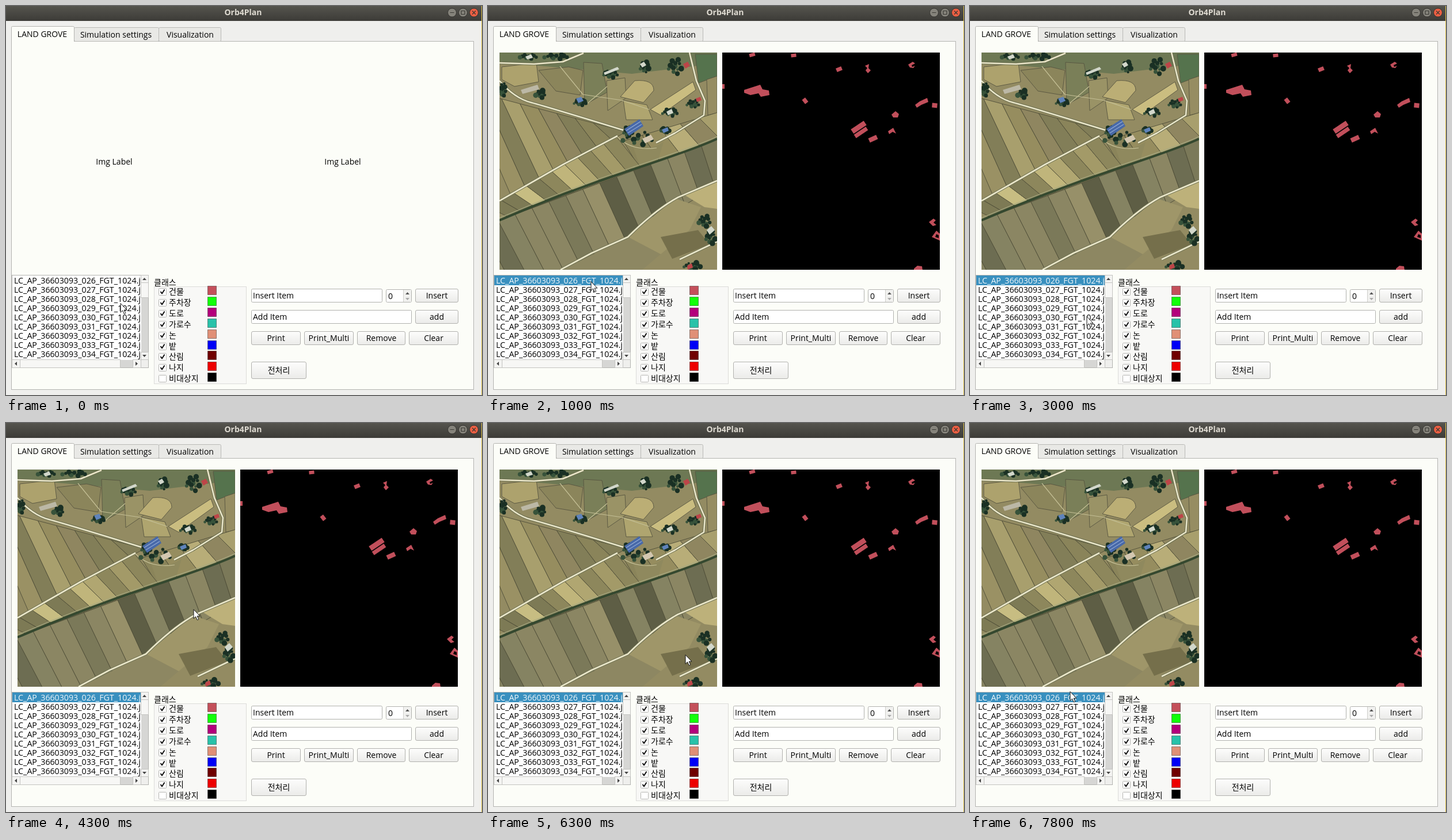
These frames come from a looping animation (827 px wide and 677 px high, 8000 ms). An HTML page:

```html
<!DOCTYPE html>
<html lang="ko">
<head>
<meta charset="utf-8">
<title>Orb4Plan</title>
<style>
html, body { margin: 0; width: 100%; height: 100%; overflow: hidden; background: #efefed; }
svg { display: block; }
text { font: 14px 'Open Sans', 'Noto Sans CJK KR', 'Noto Sans CJK', sans-serif; fill: #000; white-space: pre; }
.mid { text-anchor: middle; }
.title { font-weight: bold; fill: #dfdbd2; }
.row { font-size: 14.2px; }
.line { fill: none; stroke-linejoin: round; }
</style>
</head>
<body>
<svg id="stage" width="827" height="677" viewBox="0 0 827 677">
  <defs>
    <linearGradient id="bar" x2="0" y2="1"><stop stop-color="#55544e"/><stop offset="1" stop-color="#3c3b37"/></linearGradient>
    <linearGradient id="button" x2="0" y2="1"><stop stop-color="#fdfdfc"/><stop offset="1" stop-color="#ebebe9"/></linearGradient>
    <clipPath id="photoClip"><path d="M20 81h378v378H20z"/></clipPath>
    <clipPath id="maskClip"><path d="M407 81h378v378H407z"/></clipPath>
    <clipPath id="listClip"><path d="M11 469h223v146H11z"/></clipPath>
  </defs>
  <g id="chrome"></g>
  <g id="labels"></g>
  <g id="images">
    <g id="photo" clip-path="url(#photoClip)"></g>
    <g id="mask" clip-path="url(#maskClip)"></g>
  </g>
  <g id="list"></g>
  <g id="form"></g>
  <path id="cursor" d="M1 1.5V17.3L4.6 13.9 7.2 19.8 9.8 18.7 7.2 13H12Z" fill="#fff" stroke="#111"/>
</svg>
<script>
const $ = id => document.getElementById(id);
let layer;

function add(tag, attrs, text) {
  const node = document.createElementNS('http://www.w3.org/2000/svg', tag);
  for (const key in attrs) node.setAttribute(key, attrs[key]);
  if (text !== undefined) node.textContent = text;
  layer.append(node);
  return node;
}
const rect = (x, y, width, height, fill, more) => add('rect', { x, y, width, height, fill, ...more });
const box = (x, y, w, h, fill, stroke = '#b4b4b1', rx = 0) =>
  rect(x + .5, y + .5, w - 1, h - 1, fill, { stroke, rx });
const label = (x, y, text, cls = '') => add('text', { x, y, class: cls }, text);
const shape = (d, fill, more) => add('path', { d, fill, ...more });
const line = (d, stroke, width) => add('path', { d, stroke, 'stroke-width': width, class: 'line' });
const noise = n => { const v = Math.sin(n * 127.1 + 11.7) * 43758.5453; return v - Math.floor(v); };

function button(x, y, w, h, text) {
  box(x, y, w, h, 'url(#button)', '#b1b1ae', 2.5);
  label(x + w / 2, y + h / 2 + 5, text, 'mid');
}

function drawChrome() {
  layer = $('chrome');
  rect(0, 0, 827, 677, '#efefed');
  rect(0, 0, 827, 26, 'url(#bar)');
  rect(826, 0, 1, 677, '#d9bd45');
  label(412, 16, 'Orb4Plan', 'mid title');
  [775, 794, 813].forEach((cx, i) =>
    add('circle', { cx, cy: 11.5, r: 7.5, fill: i < 2 ? '#85837b' : '#ec5f43', stroke: '#343330' }));
  line('M771.5 11.5h7M791 8.5h6v6h-6zM810 8.5l6 6m0-6l-6 6', '#3a3934', 1.2);

  box(9, 61, 804, 607, '#fcfdf8');
  box(118, 37, 148, 25, '#e9e9e6', '#b9b9b6', 2);
  box(265, 37, 109, 25, '#e9e9e6', '#b9b9b6', 2);
  shape('M9.5 62V37.500q0-2 2-2H116.500q2 0 2 2V61', '#fcfdf8', { stroke: '#b4b4b1' });
  rect(10, 60, 108, 3, '#fcfdf8');
  label(63, 54, 'LAND GROVE', 'mid');
  label(191, 55, 'Simulation settings', 'mid');
  label(320, 55, 'Visualization', 'mid');

  layer = $('labels');
  label(188, 276, 'Img Label', 'mid');
  label(585, 276, 'Img Label', 'mid');
}

const soils = ['#9a9164', '#a89f6d', '#8a845a', '#968d5f', '#b8ad78', '#8f8660', '#827e58'];
const brightSoils = ['#a39a68', '#c0b57b', '#8d875c', '#b0a671', '#7d7a55', '#c7bd82'];
const darkSoils = ['#858362', '#6d6d52', '#979069', '#5e5e45', '#7b7959', '#8b8663'];

// Splits the area between two straight edges into field strips.
function strips([ax, ay, bx, by], [cx, cy, dx, dy], count, colors, seed) {
  const at = (a, b, t) => a + (b - a) * t;
  const edge = s => [`${at(ax, bx, s)} ${at(ay, by, s)}`, `${at(cx, dx, s)} ${at(cy, dy, s)}`];
  for (let i = 0; i < count; i++) {
    const [p, q] = edge(i / count), [r, s] = edge((i + 1) / count);
    shape(`M${p}L${r} ${s} ${q}Z`, colors[Math.floor(noise(seed + i) * colors.length)],
      { stroke: '#4f4d38', 'stroke-width': .9 });
  }
}

function grove(x, y, w, h, seed) {
  for (let i = 0; i < 12; i++) {
    const angle = i * 2.4, far = Math.sqrt(i / 12);
    add('circle', {
      cx: x + Math.cos(angle) * far * w, cy: y + Math.sin(angle) * far * h,
      r: 2 + noise(seed + i) * 3, fill: i % 3 ? '#1a3024' : '#37523a'
    });
  }
}

function drawPhoto() {
  layer = $('photo');
  rect(20, 81, 378, 378, '#938b62');
  shape('M20 81H398V100L250 118 20 98Z', '#6d7854');
  const patches = [
    ['M24 106L84 99 88 132 46 140 24 128Z', '#ada26d'],
    ['M88 112L140 106 165 112 160 155 118 148Z', '#8b855b'],
    ['M166 98L198 100 207 150 168 172Z', '#7a7f58'],
    ['M206 130L238 125 240 160 208 182Z', '#9a9366'],
    ['M255 130Q288 127 288 147L270 168 230 158Z', '#bbae75'],
    ['M282 180L356 132 361 146 300 190Z', '#cabd80'],
    ['M360 84H398V122L366 134Z', '#55734d'],
    ['M235 164L276 172 286 198 240 198Z', '#afa56f'],
    ['M380 128L398 122V186L382 190Z', '#968d62']
  ];
  for (const [d, fill] of patches) shape(d, fill, { stroke: '#565440', 'stroke-width': .9 });
  strips([-40, 145, 215, 212], [40, 330, 240, 219], 8, soils, 3);
  strips([235, 235, 400, 185], [265, 285, 440, 220], 5, soils, 31);
  strips([0, 350, 222, 226], [35, 367, 265, 280], 10, brightSoils, 12);
  strips([-100, 417, 400, 232], [-20, 560, 420, 300], 17, darkSoils, 43);
  shape('M243 402L325 335 370 350 350 390 300 432Z', '#9f9669');
  shape('M243 402L300 432 268 459H130Z', '#8d8762');
  shape('M300 402L365 390 385 415 320 440Z', '#756f4b');
  shape('M340 328L398 306V353L376 350Z', '#bdb17a');
  shape('M252 245Q275 255 305 237L295 270 265 282Z', '#8f895e');

  line('M20 373Q130 325 250 285T398 231', '#34482f', 4);
  line('M20 369Q130 321 250 281T398 227', '#a4a780', 1.3);
  const roads = 'M20 339L130 276 225 226M20 130Q45 160 75 168T235 216' +
    'M126 459L180 430 243 402Q290 355 330 333L398 304M20 99L80 101 130 97 166 82' +
    'M350 81L362 130 377 165 375 190 325 221 292 238M398 410L333 441';
  line(roads, '#6b6e4f', 4.5);
  line(roads, '#ebe7ca', 2.6);
  line('M225 228Q250 253 293 247M125 105L165 154 232 164 280 180M207 140L170 172', '#c4bf95', 1.2);

  const groves = ['325 105 14 14', '260 230 32 12', '243 218 9 9', '91 153 10 7', '160 168 13 5',
    '70 88 18 4', '118 88 25 4', '213 118 15 7', '272 106 9 10', '316 185 16 7', '356 170 13 7',
    '308 216 9 4', '376 374 12 10', '387 402 10 12', '355 452 18 6', '26 145 6 12'];
  groves.forEach((spec, i) => grove(...spec.split(' ').map(Number), i * 13));
  shape('M237 214L263 197 270 209 245 226Z', '#4869a8');
  line('M240 217L265 201M243 221L267 206', '#94acd6', 1.2);
  shape('M57 146L86 137 89 145 60 153Z', '#bcb8a6');
  shape('M268 231l15-7 5 8-15 7Z', '#d3c7b0');
  shape('M153 161l9-3 4 7-9 4ZM302 215l10-4 2 6-9 4Z', '#5f83bb');
  shape('M339 101l8-4 4 7-8 5ZM361 161l8-3 2 6-8 3ZM346 452l8-4 2 7-9 4Z', '#bd4548');
  shape('M201 116l24-10 3 4-25 10ZM264 101l7-4 4 6-7 4ZM65 88l10-4 3 6-10 3ZM380 390l8-7 6 7-9 8ZM310 184l9-5 3 7-9 4Z', '#d2d7cb');
}

function drawMask() {
  layer = $('mask');
  rect(407, 81, 378, 378, '#000');
  const fill = '#c14f5b';
  // Center x, center y, width, height, rotation.
  const blocks = ['459 85 10 6 -15', '531 86 9 6 -5', '610 110 10 7 -22', '551 165 7 9 -38',
    '644 211 27 9 -34', '648 220 25 7 -34', '669 231 15 8 -24', '776 173 9 8 5', '409 140 4 8 0'];
  for (const block of blocks) {
    const [x, y, w, h, turn] = block.split(' ').map(Number);
    rect(x - w / 2, y - h / 2, w, h, fill, { transform: `rotate(${turn} ${x} ${y})` });
  }
  shape('M445 146L473 137 477 145 488 147 489 155 474 158 470 152 456 155 445 151Z', fill);
  shape('M655 104l7-3-1 7 4 4-5 5-4-5 3-4Z', fill);
  shape('M730 102l8-5 4 3-6 3 1 3 5-2-3 4-6-1Z', fill);
  shape('M695 218l9-6 5 10-6-3-6 4ZM701 189l7-6 6 5-2 6-8 0Z', fill);
  shape('M742 172l8-6 13-6 2 7-12 5-8 5Z', fill);
  shape('M766 376l8-6 4 3-4 4 5 4-6 2ZM740 457l6-5 8 1 1 6H740Z', fill);
  shape('M771 402l8-11 8 7v11ZM777 402l6 2v-5l-4-2Z', fill, { 'fill-rule': 'evenodd' });
}

let highlight, thumb;
const rows = [];

function drawList() {
  layer = $('list');
  box(10, 468, 238, 162, '#fff');
  highlight = rect(11, 469, 223, 17, '#3990bf');
  for (let i = 0; i < 9; i++) {
    rows.push(label(14, 483 + i * 16, '', 'row'));
    rows[i].setAttribute('clip-path', 'url(#listClip)');
  }
  rect(235, 469, 12, 146, '#d6d6d4');
  box(234, 468, 14, 14, '#f4f4f2', '#c4c4c1');
  box(234, 602, 14, 14, '#f4f4f2', '#c4c4c1');
  rect(11, 616, 236, 13, '#d6d6d4');
  box(10, 615, 15, 15, '#f4f4f2', '#c4c4c1');
  box(220, 615, 15, 15, '#f4f4f2', '#c4c4c1');
  box(24, 615, 175, 15, '#f7f7f5', '#c4c4c1');
  rect(235, 616, 12, 13, '#efefed');
  thumb = box(234, 481, 14, 27, '#f7f7f5', '#c4c4c1');
  shape('M237 477h7l-3.500-4ZM237 607h7l-3.500 4ZM19 619v7l-4-3.500ZM225 619v7l4-3.500Z', '#444');
}

function drawForm() {
  layer = $('form');
  label(257, 486, '클래스');
  box(257, 488, 161, 170, '#f8f8f6', '#dcdcd9');
  const classes = [['건물', '#c4505b'], ['주차장', '#12ff0a'], ['도로', '#b4007c'], ['가로수', '#28c2a9'],
    ['논', '#e08f76'], ['밭', '#0000f6'], ['산림', '#700000'], ['나지', '#ed0000'], ['비대상지', '#000']];
  classes.forEach(([name, color], i) => {
    const y = Math.round(497 + i * 18.9);
    box(265, y - 6, 14, 13, '#fff', '#b6b6b3', 1);
    if (i < 8) line(`M268.500 ${y}l2.500 3.500 4.500-7`, '#111', 2);
    label(283, y + 5, name);
    box(350, Math.round(487 + i * 18.9), 16, 16, color, '#0006');
  });

  box(426, 492, 228, 24, '#fff', '#b1b1ae', 2);
  label(429, 509, 'Insert Item');
  box(660, 493, 45, 23, '#fff', '#b1b1ae', 2);
  label(664, 510, '0');
  rect(691, 494, 13, 21, '#f1f1ef');
  line('M690.500 494v21', '#cfcfcc', 1);
  shape('M694 502h7l-3.500-4Z', '#555');
  shape('M694 508h7l-3.500 4Z', '#aaa');
  box(426, 529, 279, 24, '#fff', '#b1b1ae', 2);
  label(429, 546, 'Add Item');
  button(711, 492, 75, 24, 'Insert');
  button(711, 529, 75, 24, 'add');
  button(426, 566, 86, 24, 'Print');
  button(518, 566, 86, 24, 'Print_Multi');
  button(610, 566, 84, 24, 'Remove');
  button(700, 566, 86, 24, 'Clear');
  button(426, 619, 96, 30, '전처리');
}

// Start time in ms, then one pointer position for each following 100 ms.
const moves = [
  [0, '198,516 203,522 188,526'],
  [600, '178,478'],
  [1200, '215,475 265,495 299,518'],
  [1600, '270,501 243,525'],
  [1900, '308,560 290,635 201,600 202,539'],
  [3100, '240,580 277,618'],
  [3600, '360,625 540,632 475,630'],
  [4000, '450,600 400,500 350,390 325,323 330,360 342,409'],
  [4800, '386,331'],
  [5200, '411,380 400,450 370,530 310,590 250,610 196,600 215,575 250,555 284,542'],
  [6100, '320,450 386,334 342,402'],
  [7100, '386,404 365,420 300,430 230,438 175,441 221,440'],
  [7800, '173,466']
].map(([start, path]) => [start, path.split(' ')]);

function pointerAt(time) {
  const [start, path] = moves.findLast(move => time >= move[0]);
  return path[Math.min(path.length - 1, Math.floor((time - start) / 100))];
}

function scrollAt(time) {
  if (time >= 2600 && time < 2800) return { sheet: 36603093, first: 56, shift: 22 };
  if (time >= 2800 && time < 3000) return { sheet: 36604081, first: 31, shift: 55 };
  return { sheet: 36603093, first: 26, shift: 0 };
}

function render(time) {
  const { sheet, first, shift } = scrollAt(time);
  const selected = time >= 800 && !shift;
  $('labels').style.display = time < 1000 ? '' : 'none';
  $('images').style.display = time < 1000 ? 'none' : '';
  highlight.style.display = selected ? '' : 'none';
  thumb.setAttribute('y', 481.5 + shift);
  rows.forEach((row, i) => {
    row.textContent = `LC_AP_${sheet}_${String(first + i).padStart(3, '0')}_FGT_1024.jpg`;
    row.style.fill = selected && i === 0 ? '#eef6fa' : '';
  });
  $('cursor').setAttribute('transform', `translate(${pointerAt(time)})`);
}

drawChrome();
drawPhoto();
drawMask();
drawList();
drawForm();

const startTime = performance.now();
function tick() {
  render((performance.now() - startTime) % 8000);
  requestAnimationFrame(tick);
}
tick();
</script>
</body>
</html>
```
